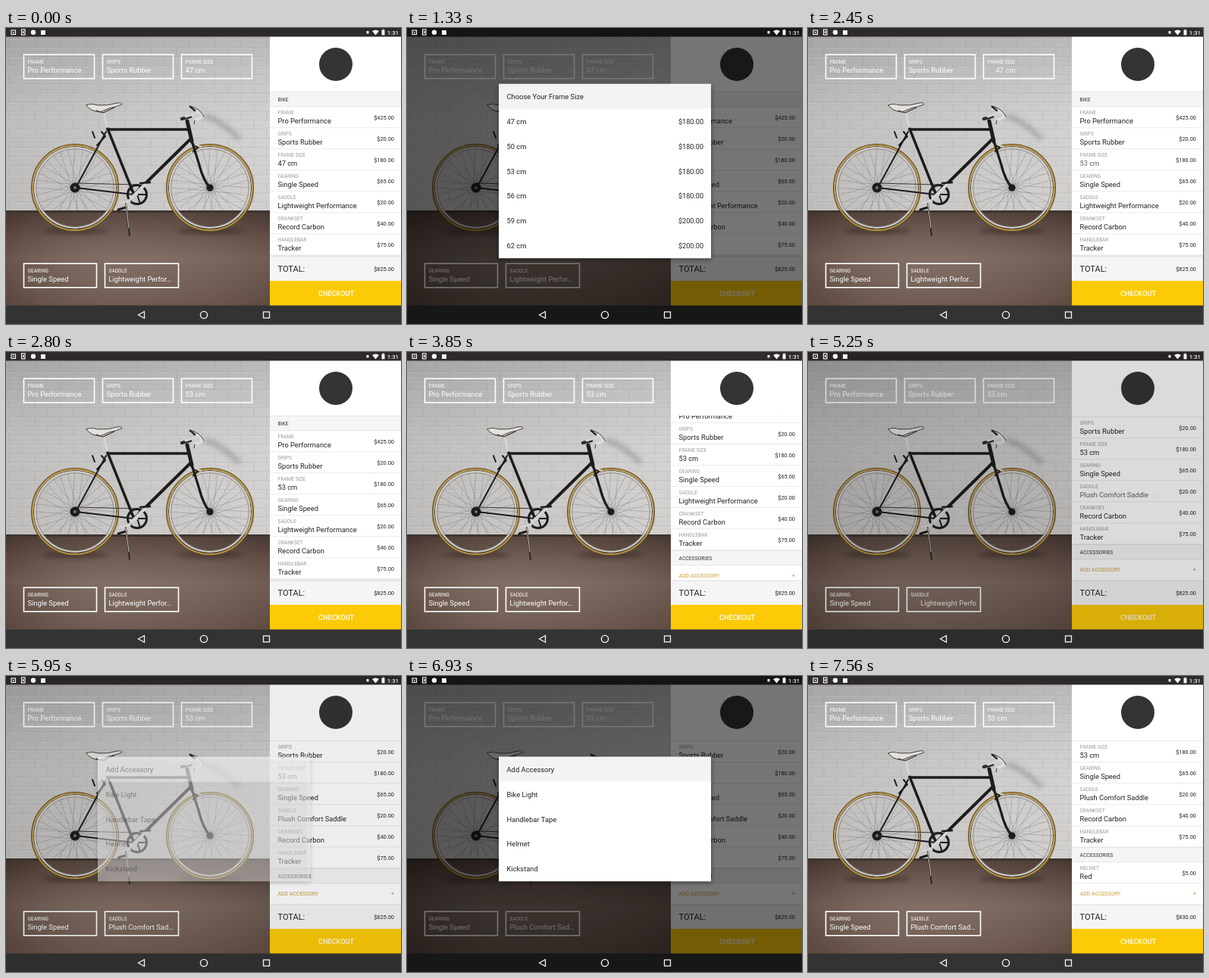
Animation of 521x391 px, one loop 8 s. Source, as an HTML page with a canvas:

```html
<!DOCTYPE html>
<html lang="en">
<head>
<meta charset="utf-8">
<title>Bike configurator</title>
<style>
  html, body { margin: 0; width: 100%; height: 100%; overflow: hidden; background: #333; }
  canvas { display: block; width: 521px; height: 391px; }
</style>
</head>
<body>
<canvas id="stage" width="521" height="391"></canvas>
<script>
const W = 521, H = 391, LOOP = 8000, DIM = 0.54;
const PANEL_X = 348, LIST_TOP = 84, LIST_BOTTOM = 302, ROW = 28;
const ctx = document.getElementById('stage').getContext('2d');

const clamp = v => Math.max(0, Math.min(1, v));
const span = (t, start, end) => clamp((t - start) / (end - start));
const ease = p => (1 - Math.cos(Math.PI * p)) / 2;

function rect(c, x, y, w, h, color) {
  c.fillStyle = color;
  c.fillRect(x, y, w, h);
}

function line(c, color, width, ...pts) {
  c.strokeStyle = color;
  c.lineWidth = width;
  c.beginPath();
  for (let i = 0; i < pts.length; i += 2) c.lineTo(pts[i], pts[i + 1]);
  c.stroke();
}

function curve(c, color, width, path) {
  c.strokeStyle = color;
  c.lineWidth = width;
  c.stroke(new Path2D(path));
}

function ring(c, x, y, r, color, width) {
  c.beginPath();
  c.arc(x, y, r, 0, Math.PI * 2);
  if (width) {
    c.strokeStyle = color;
    c.lineWidth = width;
    c.stroke();
  } else {
    c.fillStyle = color;
    c.fill();
  }
}

function text(str, x, y, size, color, align = 'left', weight = 400) {
  ctx.font = `${weight} ${size}px Roboto, sans-serif`;
  ctx.textAlign = align;
  ctx.fillStyle = color;
  ctx.fillText(str, x, y);
}

function withAlpha(alpha, draw) {
  if (alpha <= 0) return;
  ctx.save();
  ctx.globalAlpha *= alpha;
  draw();
  ctx.restore();
}

function gradient(c, x0, y0, x1, y1, ...colors) {
  const g = c.createLinearGradient(x0, y0, x1, y1);
  colors.forEach((color, i) => g.addColorStop(i / (colors.length - 1), color));
  return g;
}

// Backdrop and bicycle, painted once

function paintRoom(c) {
  rect(c, 0, 11, PANEL_X, 232, gradient(c, 0, 20, 348, 150, '#b5b3b1', '#c4c2c0', '#cfcdcb'));
  rect(c, 0, 11, PANEL_X, 232, gradient(c, 0, 11, 0, 243, 'rgba(90,88,86,.16)', 'rgba(255,255,255,.1)', 'rgba(255,255,255,.05)'));
  for (let row = 0; row < 20; row++) {
    const y = 14 + row * 12;
    line(c, 'rgba(105,102,100,.2)', 0.8, 0, y, PANEL_X, y);
    line(c, 'rgba(255,255,255,.2)', 0.8, 0, y + 1, PANEL_X, y + 1);
    for (let x = row % 2 * 17 + 4; x < PANEL_X; x += 34) {
      line(c, 'rgba(105,102,100,.16)', 0.8, x, y, x, Math.min(y + 12, 242));
    }
  }
  rect(c, 0, 242, PANEL_X, 125, gradient(c, 0, 242, 0, 366, '#4c3b34', '#67544b', '#79665c', '#705d53', '#665248'));
  rect(c, 0, 241, PANEL_X, 3, '#3e342f');
  const side = gradient(c, 0, 0, PANEL_X, 0, 'rgba(35,20,15,.2)', 'rgba(255,240,230,.06)', 'rgba(35,20,15,.12)');
  rect(c, 0, 244, PANEL_X, 122, side);

  c.filter = 'blur(3px)';
  curve(c, 'rgba(70,68,66,.3)', 6, 'M262 116 Q286 124 308 147');
  for (const x of [91, 269]) {
    c.fillStyle = 'rgba(25,15,12,.4)';
    c.beginPath();
    c.ellipse(x, 268, 44, 4, 0, 0, Math.PI * 2);
    c.fill();
  }
  c.filter = 'none';
}

function paintWheel(c, x, y) {
  for (let i = 0; i < 32; i++) {
    const a = i * Math.PI / 16, twist = a + (i % 2 ? 1.3 : -1.3);
    line(c, 'rgba(75,73,71,.5)', 0.5,
      x + 4 * Math.cos(twist), y + 4 * Math.sin(twist),
      x + 52 * Math.cos(a), y + 52 * Math.sin(a));
  }
  ring(c, x, y, 57.2, '#5a4a2a', 1.6);
  ring(c, x, y, 56, '#bd953f', 1.8);
  ring(c, x, y, 54.4, '#3f3b37', 1);
  ring(c, x, y, 52.8, '#cfccc8', 2.2);
  ring(c, x, y, 51.3, '#77736f', 0.7);
}

function paintBike(c) {
  const black = '#1d1c1c', steel = '#d6d4d1';
  c.lineCap = c.lineJoin = 'round';
  paintWheel(c, 91, 211);
  paintWheel(c, 269, 211);

  line(c, black, 2, 132, 137, 92, 211, 168, 220);
  line(c, '#3a3735', 1, 91, 205, 172, 207);
  line(c, black, 3.4, 134, 133, 168, 218);
  line(c, black, 3.6, 134, 134, 242, 134);
  line(c, black, 4, 243, 147, 171, 218);
  line(c, black, 5, 239, 123, 245, 149);
  curve(c, black, 3.2, 'M245 149 L255 181 Q260 201 269 211');
  ring(c, 91, 211, 6.5, black);
  ring(c, 91, 211, 2, '#77736f');
  ring(c, 269, 211, 4.5, black);

  ring(c, 173, 220, 12.5, black, 3);
  for (let i = 0; i < 5; i++) {
    const a = i * Math.PI * 0.4;
    line(c, black, 2, 173, 220, 173 + 12 * Math.cos(a), 220 + 12 * Math.sin(a));
  }
  line(c, steel, 4, 165, 225, 184, 206);
  line(c, black, 2.5, 177, 205, 190, 204);
  line(c, steel, 2.6, 173, 220, 157, 231);
  line(c, black, 3, 148, 240, 158, 237);
  line(c, steel, 2, 150, 231, 164, 229);
  line(c, '#292625', 2, 158, 232, 163, 274);
  line(c, steel, 0.9, 158, 232, 162, 264);

  line(c, steel, 3, 129, 111, 133, 130);
  c.fillStyle = '#e4e2df';
  const saddle = new Path2D('M106 102 Q111 99 121 102 Q135 103 147 99 Q153 98 153 101 Q145 104 136 106 L124 111 Q111 110 106 102Z');
  c.fill(saddle);
  c.strokeStyle = '#45413e';
  c.lineWidth = 1;
  c.stroke(saddle);
  line(c, '#35312f', 1.2, 119, 109, 128, 112, 143, 105);

  curve(c, black, 2, 'M120 155 L131 143 L126 137 M114 137 L117 145');
  curve(c, black, 2, 'M244 151 L253 158 L247 163');
  line(c, steel, 1.4, 249, 154, 258, 157);
  line(c, '#2b2928', 4.4, 232, 120, 243, 117);
  line(c, steel, 3, 237, 117, 253, 112);
  curve(c, '#e0deda', 3.4, 'M244 106 Q253 107 259 116 Q257 120 249 121');
  curve(c, '#383532', 1, 'M242 103 Q256 106 261 117 M249 122 L248 127');
  line(c, '#2b2928', 2.6, 243, 104, 249, 109);
}

const photo = document.createElement('canvas');
photo.width = W;
photo.height = H;
const photoCtx = photo.getContext('2d');
paintRoom(photoCtx);
paintBike(photoCtx);

// Content and timing

const frameChange = { from: '47 cm', to: '53 cm', start: 2380, end: 2700 };
const saddleChange = {
  from: 'Lightweight Performance', to: 'Plush Comfort Saddle',
  shortFrom: 'Lightweight Perfor…', shortTo: 'Plush Comfort Sad…',
  start: 5180, end: 5480
};
const HELMET_AT = 7210;

const tiles = [
  [23, 35, 94, 'FRAME', 'Pro Performance'],
  [127, 35, 94, 'GRIPS', 'Sports Rubber'],
  [231, 35, 94, 'FRAME SIZE', frameChange],
  [23, 311, 97, 'GEARING', 'Single Speed'],
  [130, 311, 98, 'SADDLE', saddleChange]
];

const parts = [
  ['FRAME', 'Pro Performance', '$425.00'],
  ['GRIPS', 'Sports Rubber', '$20.00'],
  ['FRAME SIZE', frameChange, '$180.00'],
  ['GEARING', 'Single Speed', '$65.00'],
  ['SADDLE', saddleChange, '$20.00'],
  ['CRANKSET', 'Record Carbon', '$40.00'],
  ['HANDLEBAR', 'Tracker', '$75.00']
];

const dialogs = [
  {
    title: 'Choose Your Frame Size', open: [1190, 1330], close: [2240, 2430],
    items: [47, 50, 53, 56, 59, 62].map(n => [n + ' cm', n < 59 ? '$180.00' : '$200.00'])
  },
  {
    title: 'Choose Your Saddle', open: [4340, 4500], close: [5110, 5300],
    items: [['Lightweight Performance', '$20.00'], ['Plush Comfort Saddle', '$20.00']]
  },
  {
    title: 'Add Accessory', open: [5930, 6090], close: [6990, 7180],
    items: [['Bike Light'], ['Handlebar Tape'], ['Helmet'], ['Kickstand']]
  }
];

function drawTile([x, y, w, label, value], t) {
  ctx.strokeStyle = '#fff';
  ctx.lineWidth = 1.6;
  ctx.strokeRect(x + 0.5, y + 0.2, w - 1, 31.6);
  text(label, x + 5.5, y + 12, 6.6, '#fff');
  const put = (str, dx) => text(str, x + 5.5 + dx, y + 24, 9.4, '#fff');
  if (typeof value === 'string') return put(value, 0);

  const p = ease(span(t, value.start, value.end));
  ctx.save();
  ctx.beginPath();
  ctx.rect(x + 5, y + 2, w - 11, 28);
  ctx.clip();
  withAlpha(1 - p, () => put(value.shortFrom || value.from, p * w));
  withAlpha(p, () => put(value.shortTo || value.to, (p - 1) * w));
  ctx.restore();
}

function drawRow([label, value, price], y, t) {
  rect(ctx, PANEL_X, y + ROW - 0.6, W - PANEL_X, 0.8, '#e4e4e4');
  text(label, 358.5, y + 10.4, 6.6, '#9a9a9a');
  const put = str => text(str, 358.5, y + 22.4, 9.3, '#222');
  if (typeof value === 'string') {
    put(value);
  } else {
    const p = span(t, value.start - 70, value.end - 70);
    withAlpha(1 - 2 * p, () => put(value.from));
    withAlpha(2 * p - 0.25, () => put(value.to));
  }
  text(price, 512, y + 17, 7.4, '#222', 'right');
}

function drawHeading(label, y) {
  rect(ctx, PANEL_X, y, W - PANEL_X, 20, '#f5f5f5');
  rect(ctx, PANEL_X, y, W - PANEL_X, 0.8, '#e2e2e2');
  rect(ctx, PANEL_X, y + 19.4, W - PANEL_X, 0.8, '#e2e2e2');
  text(label, 358.5, y + 12.8, 6.8, '#333');
}

function drawPanel(t) {
  const hasHelmet = t >= HELMET_AT;
  const scroll = 46 * ease(span(t, 3290, 4060)) + 28 * ease(span(t, HELMET_AT, 7520));
  rect(ctx, PANEL_X, 11, W - PANEL_X, 356, '#fff');

  ctx.save();
  ctx.beginPath();
  ctx.rect(PANEL_X, LIST_TOP, W - PANEL_X, LIST_BOTTOM - LIST_TOP);
  ctx.clip();
  let y = LIST_TOP - scroll;
  drawHeading('BIKE', y);
  y += 20;
  for (const part of parts) {
    drawRow(part, y, t);
    y += ROW;
  }
  drawHeading('ACCESSORIES', y);
  y += 20;
  if (hasHelmet) {
    withAlpha(span(t, HELMET_AT, 7400), () => drawRow(['HELMET', 'Red', '$5.00'], y, t));
    y += ROW;
  }
  text('ADD ACCESSORY', 358.5, y + 16.4, 6.9, '#c79c35');
  text('+', 512, y + 16.4, 7.5, '#b58f3a', 'right');
  ctx.restore();

  ring(ctx, 435, 48, 22, '#333436');

  rect(ctx, PANEL_X, LIST_BOTTOM, W - PANEL_X, 32, '#f5f5f5');
  rect(ctx, PANEL_X, LIST_BOTTOM - 0.5, W - PANEL_X, 1, '#dedede');
  text('TOTAL:', 358.5, 322, 11, '#222');
  text(hasHelmet ? '$830.00' : '$825.00', 512, 320.5, 7.4, '#222', 'right');
  rect(ctx, PANEL_X, 334, W - PANEL_X, 33, '#fcca07');
  text('CHECKOUT', 435.5, 353.8, 9.1, '#fff', 'center', 500);
}

function drawDialog({ title, items, open, close }, t) {
  if (t < open[0] || t > close[1]) return;
  const enter = span(t, ...open), leave = span(t, ...close);
  rect(ctx, 0, 0, W, H, `rgba(0,0,0,${DIM * enter * (1 - leave)})`);
  const alpha = (1 - (1 - enter) ** 4) * clamp(1 - 1.5 * leave);
  const step = 32.9, height = (items.length + 1) * step, top = 189 - height / 2;
  withAlpha(alpha, () => {
    ctx.save();
    ctx.shadowColor = 'rgba(0,0,0,.4)';
    ctx.shadowBlur = 6;
    ctx.shadowOffsetY = 2;
    rect(ctx, 121, top, 280, height, '#fff');
    ctx.restore();
    rect(ctx, 121, top, 280, step, '#f2f3f5');
    text(title, 131.5, top + 20, 9.4, '#222');
    items.forEach(([name, price], i) => {
      const y = top + (i + 1) * step + 20;
      text(name, 131.5, y, 9.4, '#222');
      if (price) text(price, 391, y, 9.1, '#222', 'right');
    });
  });
}

function drawSystemIcons() {
  const white = '#f4f4f4';
  ctx.strokeStyle = white;
  ctx.lineWidth = 1.2;
  ctx.strokeRect(7, 3, 5.5, 5.5);
  rect(ctx, 9, 5, 1.6, 1.6, white);
  ctx.strokeRect(20.5, 2, 4.5, 7);
  rect(ctx, 22, 4, 1.6, 3, white);
  ring(ctx, 36, 5.7, 3.2, white);
  rect(ctx, 46, 3, 6, 6, white);

  rect(ctx, 475.5, 4, 3, 3.5, white);
  ctx.fillStyle = white;
  ctx.fill(new Path2D('M483 4 Q487.5 1 492 4 L487.5 9.5Z'));
  rect(ctx, 495.5, 2.6, 4, 6.8, white);
  rect(ctx, 496.6, 1.6, 1.8, 1, white);
  text('1:31', 518, 8.6, 7.8, white, 'right', 500);

  curve(ctx, white, 1.3, 'M182.5 374.5 L174.5 379 L182.5 383.5Z');
  ring(ctx, 261, 379, 4.6, white, 1.4);
  ctx.lineWidth = 1.3;
  ctx.strokeRect(339.5, 375, 8, 8);
}

function draw(t) {
  ctx.drawImage(photo, 0, 0);
  for (const tile of tiles) drawTile(tile, t);
  drawPanel(t);
  rect(ctx, 0, 0, W, 11.5, '#2d2a29');
  rect(ctx, 0, 366.5, W, 25, '#333');
  for (const dialog of dialogs) drawDialog(dialog, t);
  drawSystemIcons();
}

const began = performance.now();
function tick() {
  draw((performance.now() - began) % LOOP);
  requestAnimationFrame(tick);
}
tick();
</script>
</body>
</html>
```
